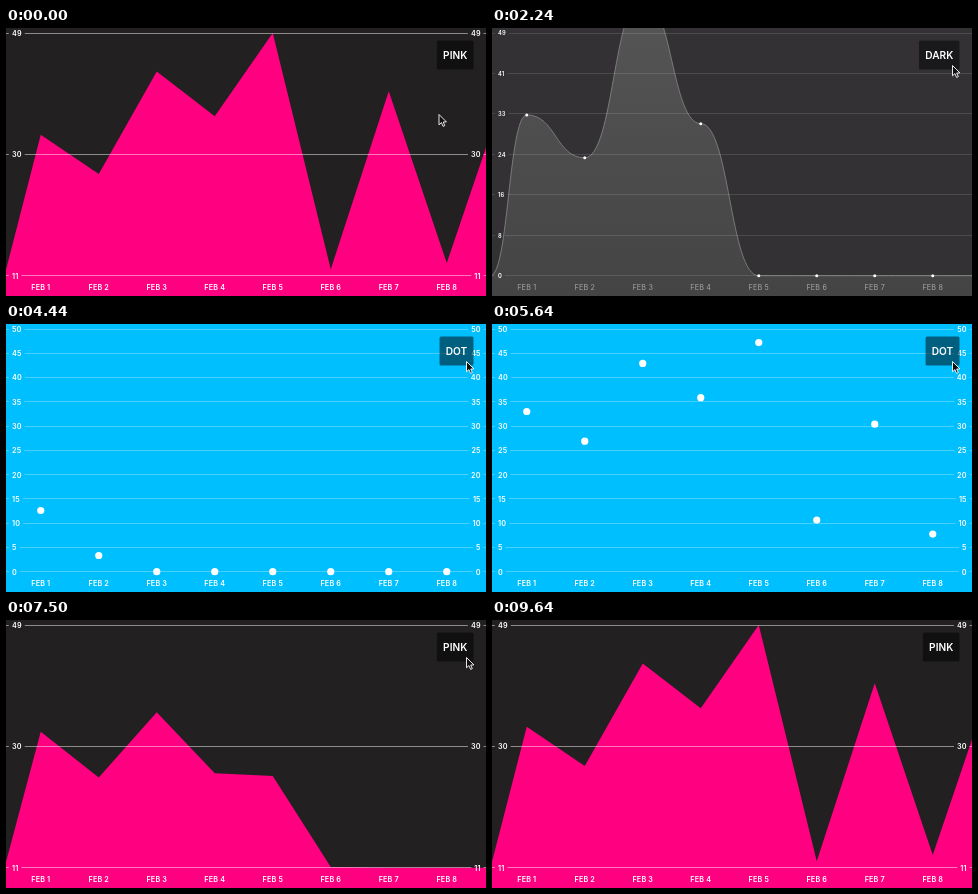
These frames come from a looping animation (480x268 px, 9.68 s). An HTML page with a canvas:

```html
<!DOCTYPE html>
<html lang="en">
<head>
<meta charset="utf-8">
<title>Graph themes</title>
<style>
  html, body { margin: 0; width: 100%; height: 100%; overflow: hidden; background: #222021; }
  canvas { display: block; }
</style>
</head>
<body>
<canvas id="stage" width="480" height="268"></canvas>
<script>
const ctx = document.getElementById('stage').getContext('2d');
const WIDTH = 480, HEIGHT = 268, LOOP = 9680;
const TOP = 5, BOTTOM = 247.7, FIRST_X = 34.75, SPACING = 58, LEFT_PADDING = 36.3;
const STAGGER = 150;
const values = [33, 26.9, 42.9, 35.9, 48.9, 12, 39.8, 13, 39.6];

const clamp = t => Math.min(1, Math.max(0, t));
const easeOut = t => 1 - (1 - t) ** 2;
const easeInOut = t => t * t * (3 - 2 * t);
const elastic = t => t <= 0 ? 0 : t >= 1 ? 1
  : 2 ** (-10 * t) * Math.sin((t - 0.075) * 2 * Math.PI / 0.3) + 1;

const pink = {
  name: 'PINK', background: '#222021', min: 11, max: 48.9, steps: 2, bothSides: true,
  lineColor: 'rgba(255,255,255,.48)', labelSize: 7.25, dateColor: '#fff', dateWeight: 600,
  duration: 1000, ease: easeOut, fill: ['#ff0080', '#ff0080']
};
const dark = {
  name: 'DARK', background: '#333134', min: 0, max: 48.9, steps: 6, bothSides: false,
  lineColor: 'rgba(255,255,255,.12)', labelSize: 5.8, dateColor: 'rgba(255,255,255,.5)', dateWeight: 400,
  duration: 1500, ease: elastic, fill: ['#545454', '#444444'], smooth: true, stroke: '#808080', dot: 1.5
};
const dots = {
  name: 'DOT', background: '#00bfff', min: 0, max: 50, steps: 10, bothSides: true,
  lineColor: 'rgba(255,255,255,.28)', labelSize: 7.25, dateColor: '#fff', dateWeight: 600,
  duration: 1000, ease: easeOut, dot: 3.6
};
const scenes = [
  { start: 6690 - LOOP, theme: pink },
  { start: 1695, theme: dark },
  { start: 4227, theme: dots },
  { start: 6690, theme: pink }
];

// Vertical centring is by cap height.
function text(string, x, y, size, weight, color, align) {
  ctx.font = `${weight} ${size}px Inter, sans-serif`;
  ctx.letterSpacing = size < 8 ? '0.15px' : '0px';
  ctx.textAlign = align;
  ctx.fillStyle = color;
  ctx.fillText(string, x, y + size * 0.364);
  return ctx.measureText(string).width;
}

function rule(x1, x2, y, color) {
  ctx.fillStyle = color;
  ctx.fillRect(x1, Math.floor(y), x2 - x1, 1);
}

function pointsAt(theme, elapsed) {
  return values.map((value, i) => {
    const progress = theme.ease(clamp((elapsed - i * STAGGER) / theme.duration));
    const height = (BOTTOM - TOP) * (value - theme.min) / (theme.max - theme.min);
    return { x: FIRST_X + i * SPACING, y: BOTTOM - height * progress };
  });
}

function drawArea(theme, points) {
  const curve = new Path2D();
  let last = { x: FIRST_X - LEFT_PADDING, y: BOTTOM };
  curve.moveTo(last.x, last.y);
  for (const p of points) {
    const mid = (last.x + p.x) / 2;
    if (theme.smooth) curve.bezierCurveTo(mid, last.y, mid, p.y, p.x, p.y);
    else curve.lineTo(p.x, p.y);
    last = p;
  }
  const area = new Path2D(curve);
  area.lineTo(last.x, HEIGHT);
  area.lineTo(FIRST_X - LEFT_PADDING, HEIGHT);
  area.closePath();
  const gradient = ctx.createLinearGradient(0, 0, 0, HEIGHT);
  theme.fill.forEach((color, i) => gradient.addColorStop(i, color));
  ctx.fillStyle = gradient;
  ctx.fill(area);
  if (theme.stroke) {
    ctx.strokeStyle = theme.stroke;
    ctx.lineWidth = 0.9;
    ctx.stroke(curve);
  }
}

function drawScale(theme) {
  for (let i = 0; i <= theme.steps; i++) {
    const y = TOP + (BOTTOM - TOP) * i / theme.steps;
    const label = Math.round(theme.max - (theme.max - theme.min) * i / theme.steps);
    const width = text(label, 6, y + 0.3, theme.labelSize, 600, '#fff', 'left');
    let end = WIDTH;
    if (theme.bothSides) {
      text(label, 474.7, y + 0.3, theme.labelSize, 600, '#fff', 'right');
      end = 474.7 - width - 3;
      rule(477.5, WIDTH, y, theme.lineColor);
    }
    rule(0, 2.8, y, theme.lineColor);
    rule(6 + width + 3, end, y, theme.lineColor);
  }
}

function drawButton(name) {
  ctx.font = '600 10.15px Inter, sans-serif';
  ctx.letterSpacing = '0px';
  const width = ctx.measureText(name).width + 12.5;
  ctx.fillStyle = 'rgba(0,0,0,.5)';
  ctx.beginPath();
  ctx.roundRect(467.5 - width, 12.5, width, 29, 1.5);
  ctx.fill();
  text(name, 467.5 - width / 2, 27, 10.15, 600, '#fff', 'center');
}

function drawCursor(time) {
  const enter = easeInOut(clamp((time - 60) / 900));
  const leave = easeInOut(clamp((time - 8950) / 500));
  if (leave === 1) return;
  ctx.save();
  ctx.translate(432.5 + 27.5 * enter + 24 * leave, 86 - 49 * enter + 20 * leave);
  ctx.beginPath();
  ctx.moveTo(0.5, 0.5);
  [[0.5, 10.8], [2.9, 8.6], [4.6, 12.4], [6.3, 11.6], [4.7, 8], [7.9, 7.9]].forEach(p => ctx.lineTo(...p));
  ctx.closePath();
  ctx.fillStyle = '#111';
  ctx.fill();
  ctx.strokeStyle = '#fff';
  ctx.lineWidth = 0.9;
  ctx.stroke();
  ctx.restore();
}

function draw(time) {
  const { start, theme } = scenes.findLast(scene => scene.start <= time);
  const points = pointsAt(theme, time - start);
  ctx.fillStyle = theme.background;
  ctx.fillRect(0, 0, WIDTH, HEIGHT);
  if (theme.fill) drawArea(theme, points);
  drawScale(theme);
  points.forEach((p, i) => {
    text('FEB ' + (i + 1), p.x, 259.3, 7.25, theme.dateWeight, theme.dateColor, 'center');
    if (!theme.dot) return;
    ctx.fillStyle = '#fff';
    ctx.beginPath();
    ctx.arc(p.x, p.y, theme.dot, 0, 2 * Math.PI);
    ctx.fill();
  });
  drawButton(theme.name);
  drawCursor(time);
}

const began = performance.now();
function tick() {
  draw((performance.now() - began) % LOOP);
  requestAnimationFrame(tick);
}
tick();
</script>
</body>
</html>
```
